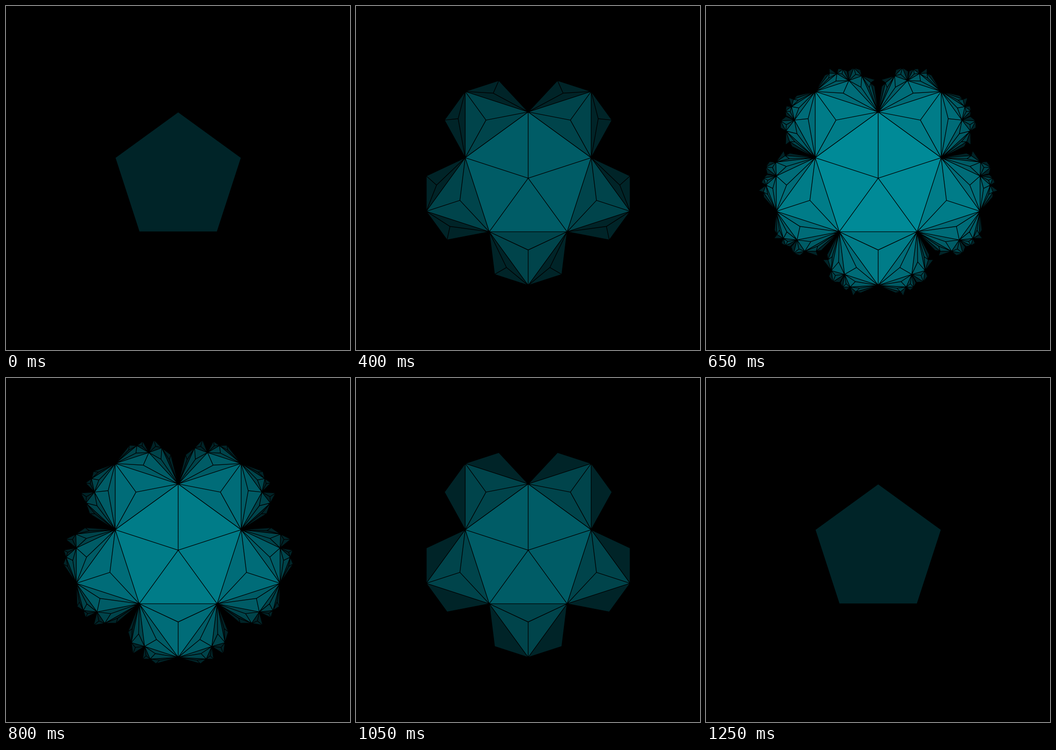
An HTML page with a canvas for the animation above (1300 ms loop, 748 by 748 pixels).

```html
<!DOCTYPE html>
<html lang="en">
<head>
<meta charset="utf-8">
<title>Unfolding pentagon</title>
<style>
  html, body { margin: 0; width: 100%; height: 100%; overflow: hidden; background: #000; }
  canvas { display: block; }
</style>
</head>
<body>
<canvas id="stage" width="748" height="748"></canvas>
<script>
const ctx = document.getElementById('stage').getContext('2d');
const MID = [374.4, 374.4], RADIUS = 144, MAX_STEP = 10;
const LOOP = 1300, TICK = 50;
// Pull of the tip and of the younger base corner on a triangle's hub.
const TIP_PULL = 0.34, YOUNG_PULL = 0.6;
// Shades from the outermost ring inwards.
const SHADES = ['#002428', '#00444b', '#005c66', '#006c78', '#007c88', '#008a97'];

const mix = (p, q, k) => [p[0] + (q[0] - p[0]) * k, p[1] + (q[1] - p[1]) * k];

// Mirror image of p in the line ab.
function mirror(p, a, b) {
  const dx = b[0] - a[0], dy = b[1] - a[1];
  const k = ((p[0] - a[0]) * dx + (p[1] - a[1]) * dy) / (dx * dx + dy * dy);
  return mix(p, mix(a, b, k), 2);
}

const levels = Array.from({ length: MAX_STEP / 2 + 1 }, () => []);

// Mirror the parent's hub over its edge to get a new triangle, then recurse.
function grow(older, younger, parentHub, depth, pull = YOUNG_PULL) {
  if (depth >= levels.length) return;
  const tip = mirror(parentHub, older, younger);
  const hub = mix(mix(older, younger, pull), tip, TIP_PULL);
  levels[depth].push({ points: [older, tip, younger], hub });
  grow(older, tip, hub, depth + 1);
  grow(younger, tip, hub, depth + 1);
}

const pentagon = Array.from({ length: 5 }, (_, i) => {
  const angle = (i * 0.4 - 0.5) * Math.PI;
  return [MID[0] + RADIUS * Math.cos(angle), MID[1] + RADIUS * Math.sin(angle)];
});
levels[0].push({ points: pentagon, hub: MID });
pentagon.forEach((p, i) => grow(p, pentagon[(i + 1) % 5], MID, 1, 0.5));

function outline(points) {
  points.forEach((p, i) => i ? ctx.lineTo(...p) : ctx.moveTo(...p));
  ctx.closePath();
}

function draw(step) {
  const last = step >> 1;
  ctx.fillStyle = '#000';
  ctx.fillRect(0, 0, 748, 748);

  for (let d = last; d >= 0; d--) {
    ctx.fillStyle = SHADES[last - d];
    for (const { points } of levels[d]) {
      ctx.beginPath();
      outline(points);
      ctx.fill();
    }
  }

  ctx.strokeStyle = '#000';
  ctx.lineWidth = 1.4;
  ctx.lineJoin = 'round';
  ctx.beginPath();
  for (let d = 0; d <= last; d++) {
    const split = d < last || step % 2;
    for (const { points, hub } of levels[d]) {
      outline(points);
      if (split) points.forEach(p => { ctx.moveTo(...hub); ctx.lineTo(...p); });
    }
  }
  ctx.stroke();
}

// Rise one step per tick, hold, then fall back.
function stepAt(time) {
  const tick = Math.floor((time % LOOP) / TICK);
  return Math.max(0, Math.min(tick - 3, 25 - tick, MAX_STEP));
}

const start = performance.now();
let shown = 0;
draw(shown);

function frame() {
  const step = stepAt(performance.now() - start);
  if (step !== shown) draw(shown = step);
  requestAnimationFrame(frame);
}
requestAnimationFrame(frame);
</script>
</body>
</html>
```
